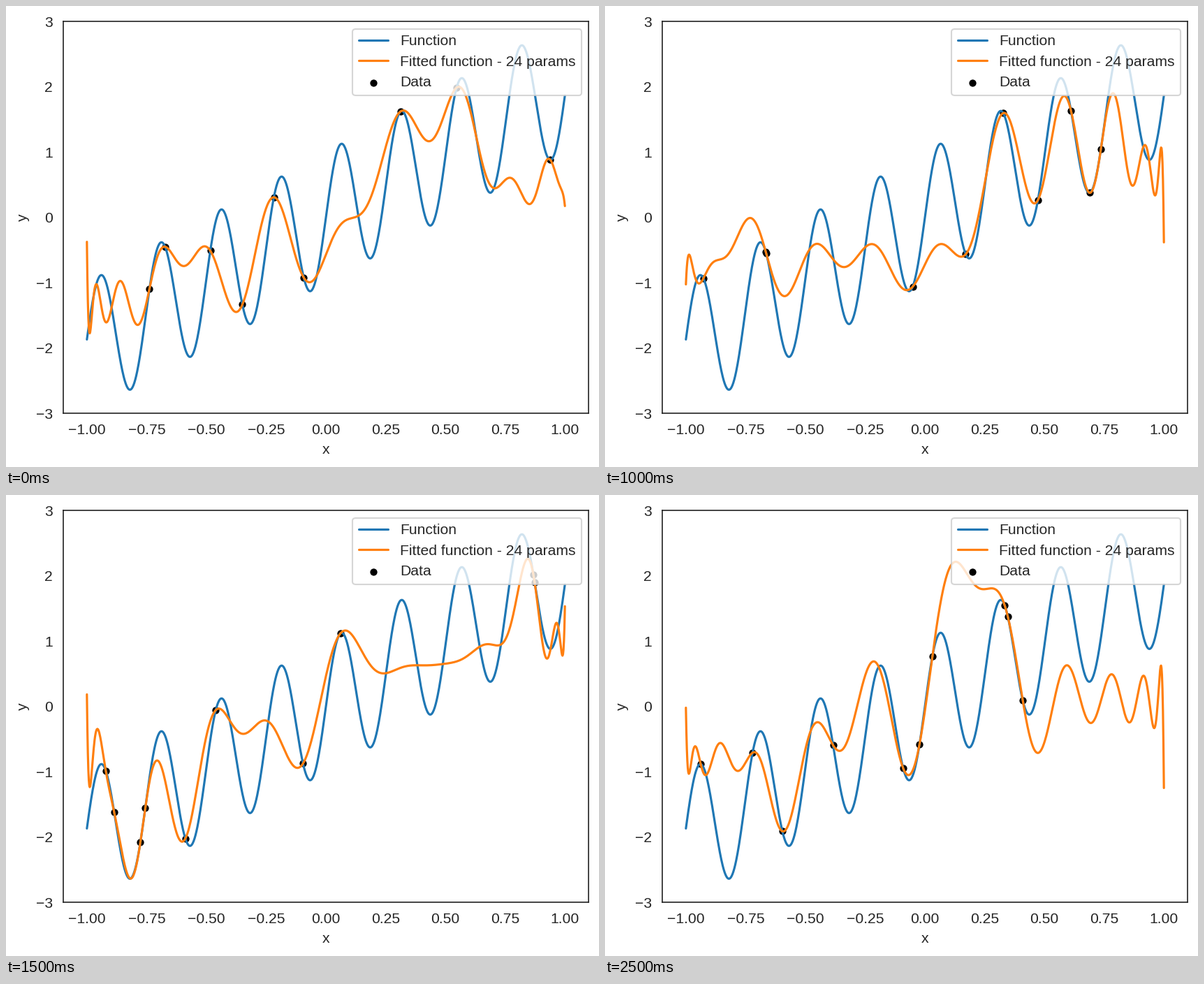
A matplotlib script for the animation above (3 s loop, 849 by 660 pixels).

```python
import matplotlib.pyplot as plt
import numpy as np
from matplotlib.animation import FuncAnimation
from numpy.polynomial.legendre import legvander

W, H, DPI = 849, 660, 72  # at 72 dpi one point is one pixel
PT = 152 / 72             # scale of the default plot sizes
PARAMS = 24
INK = "0.15"

# x positions of the samples in each draw
SAMPLES = [
    [-.7382, -.673, -.4836, -.3495, -.2177, -.0926, .3135, .547, .9395],
    [-.853, -.66, -.528, -.5027, -.325, -.1382, .0392, .2342, .4134, .6579],
    [-.9266, -.6655, -.6645, -.0511, .1708, .3277, .4728, .6115, .6885, .7362],
    [-.921, -.8857, -.7763, -.7558, -.588, -.4607, -.0957, .0615, .868, .8733],
    [-.9902, -.917, -.703, -.3676, .0143, .2781, .7358, .9037, .9305, .9733],
    [-.938, -.721, -.5963, -.384, -.0908, -.0225, .0311, .3337, .347, .4093],
]


def truth(x):
    return 2 * x + np.sin(25 * x)


def features(x):
    """Legendre polynomials of degree 1 to PARAMS."""
    return legvander(x, PARAMS)[:, 1:]


def fit(x):
    """Minimum-norm weights that pass through every sample."""
    return np.linalg.lstsq(features(x), truth(x), rcond=None)[0]


plt.rcParams.update({
    "font.family": "Liberation Sans",
    "font.size": 10 * PT,
    "text.color": INK,
    "axes.labelcolor": INK,
    "axes.edgecolor": INK,
    "axes.linewidth": 0.8 * PT,
    "lines.linewidth": 1.5 * PT,
    "lines.solid_capstyle": "round",
    "patch.linewidth": PT,
})

grid = np.linspace(-1, 1, 1000)
draws = [np.array(xs) for xs in SAMPLES]
curves = [features(grid) @ fit(xs) for xs in draws]

fig = plt.figure(figsize=(W / DPI, H / DPI), dpi=DPI, facecolor="white")
left, right, top, bottom = 81.6, 834.4, 22.3, 583.3
ax = fig.add_axes([left / W, 1 - bottom / H, (right - left) / W, (bottom - top) / H])
ax.set(xlim=(-1.1, 1.1), ylim=(-3, 3), xticks=np.linspace(-1, 1, 9), yticks=range(-3, 4))
ax.tick_params(length=0, pad=7 * PT, labelcolor=INK)
ax.set_xlabel("x", labelpad=4 * PT)
ax.set_ylabel("y", labelpad=4 * PT)

ax.plot(grid, truth(grid), color="#1f77b4", label="Function")
fitted, = ax.plot(grid, curves[0], color="#ff7f0e",
                  label=f"Fitted function - {PARAMS} params")
dots = ax.scatter(draws[0], truth(draws[0]), s=10.3 ** 2, color="black",
                  linewidths=0, zorder=1, label="Data")
ax.legend(loc="upper right", framealpha=0.8, edgecolor="0.8")


def update(i):
    fitted.set_ydata(curves[i])
    dots.set_offsets(np.column_stack([draws[i], truth(draws[i])]))
    return fitted, dots


anim = FuncAnimation(fig, update, frames=len(draws), interval=500,
                     repeat=True, repeat_delay=0)
plt.show()
```
